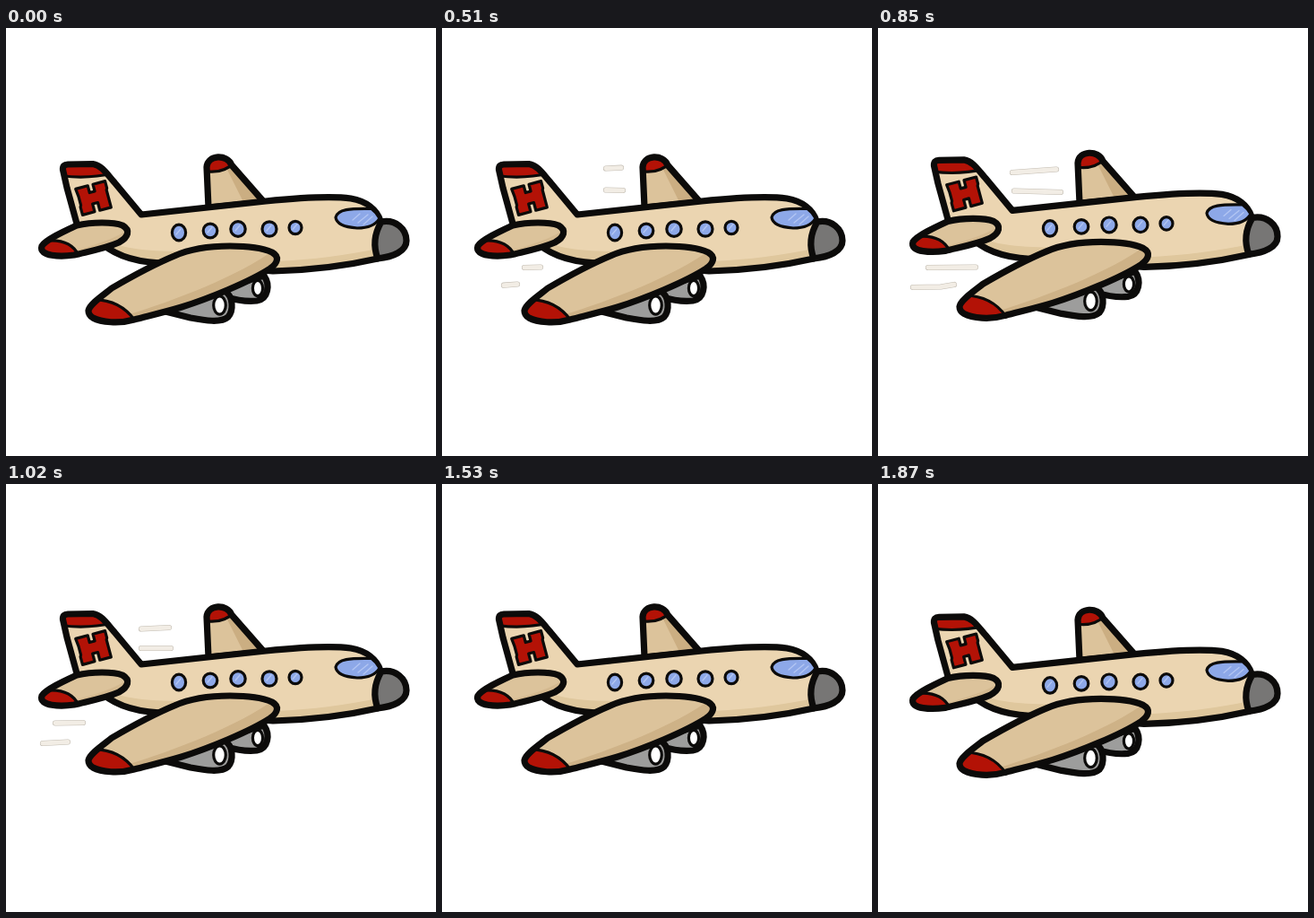
Recreate the animation shown at these times as an HTML page. Size 480 by 477 pixels, loop 2.04 s.

```html
<!DOCTYPE html>
<html lang="en">
<head>
<meta charset="utf-8">
<title>Airplane</title>
<style>
  html, body { margin: 0; width: 100%; height: 100%; overflow: hidden; background: #fff; }
  svg { display: block; width: 100%; height: 100%; }
  .ink { stroke: #0c0b0a; stroke-width: 7.2; stroke-linejoin: round; stroke-linecap: round; }
  .thin { stroke: #0c0b0a; stroke-width: 3.2; stroke-linejoin: round; stroke-linecap: round; }
  .none { fill: none; }
  .body { fill: #ebd5b1; }
  .wing { fill: #dcc39b; }
  .shade { fill: #cbae82; }
  .soft { fill: #dfc79d; }
  .red { fill: #b31206; }
  .glass { fill: #8da8e8; }
  .metal { fill: #9d9d9c; }
  .nose { fill: #777675; }
  .hole { fill: #fff; }
  .glint { fill: none; stroke: #b3c6f3; stroke-width: 1.3; stroke-linecap: round; }
  .edge, .streak { fill: none; stroke-linecap: round; stroke-linejoin: round; }
  .edge { stroke: #c2bcb2; stroke-width: 6.2; }
  .streak { stroke: #f2ede5; stroke-width: 5; }
</style>
</head>
<body>
<svg viewBox="0 0 480 477" preserveAspectRatio="none">
  <defs>
    <path id="hull" d="M79 218 L68 178 L63.5 158 Q63 152 69 152 L97 151.500 C107 153 113 163 121 172 L151 208 C195 203 240 198 290 193 C330 189 362 187 385 190 C402 193 414 202 418 215 L415 257 C380 265 340 270 298 271 L190 262 C160 263 128 258 108 241 Z"/>
    <path id="tail" d="M40 243 C44 236 66 226 79 220 C96 216 120 216 130 220 C139 225 137 233 126 239 C110 246 92 249 76 253 C62 255 36 255 40 243 Z"/>
    <path id="far" d="M226 200 L224 155 C225 141 247 140 252 153 L288 194 Z"/>
    <path id="near" d="M92 315 C93 308 108 298 118 290 C142 276 164 264 188 254 C208 245 228 243 250 243 C270 243 288 246 297 250 C306 255 303 262 295 268 C272 283 225 302 196 311 C176 317 158 321 143 325 C126 330 106 328 97 323 Q92 320 92 315 Z"/>
    <clipPath id="hullClip"><use href="#hull"/></clipPath>
    <clipPath id="tailClip"><use href="#tail"/></clipPath>
    <clipPath id="farClip"><use href="#far"/></clipPath>
    <clipPath id="nearClip"><use href="#near"/></clipPath>
  </defs>

  <path class="edge"/>
  <path class="streak"/>

  <g id="plane">
    <use href="#far" class="wing"/>
    <g clip-path="url(#farClip)">
      <path class="shade" d="M246 156 L268 200 H300 L250 148 Z"/>
      <path class="red thin" d="M215 158 Q240 165 255 150 L250 130 H215 Z"/>
    </g>
    <use href="#far" class="ink none"/>

    <use href="#hull" class="body"/>
    <g clip-path="url(#hullClip)">
      <path class="soft" d="M100 232 C130 248 165 249 200 249 L300 260 C345 258 380 253 420 245 V280 H100 Z"/>
      <path class="red thin" d="M58 164 Q88 169 120 162 V140 H58 Z"/>
    </g>
    <use href="#hull" class="ink none"/>
    <path class="red thin" transform="translate(98 189.500) rotate(-15)"
      d="M-17 -15 H-3 V-7 H3 V-15 H17 V-7 L16 -5 V15 H3 V6 H-3 V15 H-17 V6 L-16 4 V-6 Z"/>
    <path class="nose ink" d="M419 216 C435 213 447 224 447 237 C447 249 432 255 415 257 Q407 236 419 216 Z"/>

    <path class="glass thin" d="M368 211 C370 202 384 201 408 201.500 Q414 206 417 212 C412 221 402 223 392 223 C378 222 369 219 368 211 Z"/>
    <path class="glint" d="M387 214 L395 207 M393 217 L404 208 M399 219 L409 210"/>
    <g id="windows"></g>

    <use href="#tail" class="wing"/>
    <g clip-path="url(#tailClip)">
      <path class="shade" d="M80 247 Q118 237 138 224 V250 H80 Z" opacity=".45"/>
      <path class="red thin" d="M46 237 Q72 235 81 253 L70 265 H30 V238 Z"/>
    </g>
    <use href="#tail" class="ink none"/>

    <path class="metal ink" d="M240 290 L288 276 C295 286 293 302 280 304 C270 305 256 303 246 300 Z"/>
    <ellipse class="hole thin" cx="281" cy="290" rx="5.6" ry="8.6"/>
    <path class="metal ink" d="M178 316 L244 293 C254 299 254 315 248 322 C240 329 222 326 206 323 Z"/>
    <ellipse class="hole thin" cx="238.5" cy="309" rx="6.8" ry="10.2"/>

    <use href="#near" class="wing"/>
    <g clip-path="url(#nearClip)">
      <path class="shade" d="M135 320 C190 303 258 277 300 247 L312 270 L200 322 L135 335 Z" opacity=".8"/>
      <path class="red thin" d="M94 303 Q126 301 144 326 L130 340 H80 V306 Z"/>
    </g>
    <use href="#near" class="ink none"/>
  </g>
</svg>
<script>
(() => {
  const STEP = 170;
  const plane = document.getElementById('plane');
  const trails = document.querySelectorAll('.edge, .streak');

  // cx, cy, rx, ry
  const panes = [
    [193, 228, 7.6, 8.8], [228, 226, 7.8, 7.8], [259, 224, 8.2, 8.4],
    [294, 224, 8, 8.2], [323, 222.5, 7, 7.2]
  ];
  document.getElementById('windows').innerHTML = panes.map(([x, y, rx, ry]) =>
    `<ellipse class="glass thin" cx="${x}" cy="${y}" rx="${rx}" ry="${ry}"/>
     <path class="glint" d="M${x - 3} ${y + 2} L${x + 2} ${y - 4}"/>`).join('');

  // Plane offset for each step of the bob
  const low = [0, 0], rising = [-1, -3.6], high = [-1, -4.6], peak = [0, -7];
  const poses = [low, low, low, low, rising, high, peak, peak, peak, peak, high, rising];

  // Speed lines, by step
  const streaks = {
    3: 'M183 156.5 L200 155.7 M183 180.5 L202 181 M92 267 L110 266.5 M69 286.7 L84 285.5',
    4: 'M165 159.5 L201 156 M162 181 L202 182.5 M75 266 L109 266.5 M53 288.3 L84 286',
    5: 'M150 161 L199 157.5 M152 181.5 L204 183 M56 267 L109 266.5 M39 289 L70 288.5 L85 286',
    6: 'M151 161.5 L182 160 M151 183 L184 183 M55 266.5 L86 266 M41 289 L69 287.5',
    7: 'M151 161.5 L164 161 M151 183 L165 183 M55 266.5 L68 266.3 M41 289 L53 288.5'
  };

  let shown = -1;
  const start = performance.now();

  function draw(now) {
    const i = Math.floor(Math.max(0, now - start) / STEP) % poses.length;
    if (i !== shown) {
      shown = i;
      plane.setAttribute('transform', `translate(${poses[i]})`);
      trails.forEach(p => p.setAttribute('d', streaks[i] || ''));
    }
    requestAnimationFrame(draw);
  }
  draw(start);
})();
</script>
</body>
</html>
```
